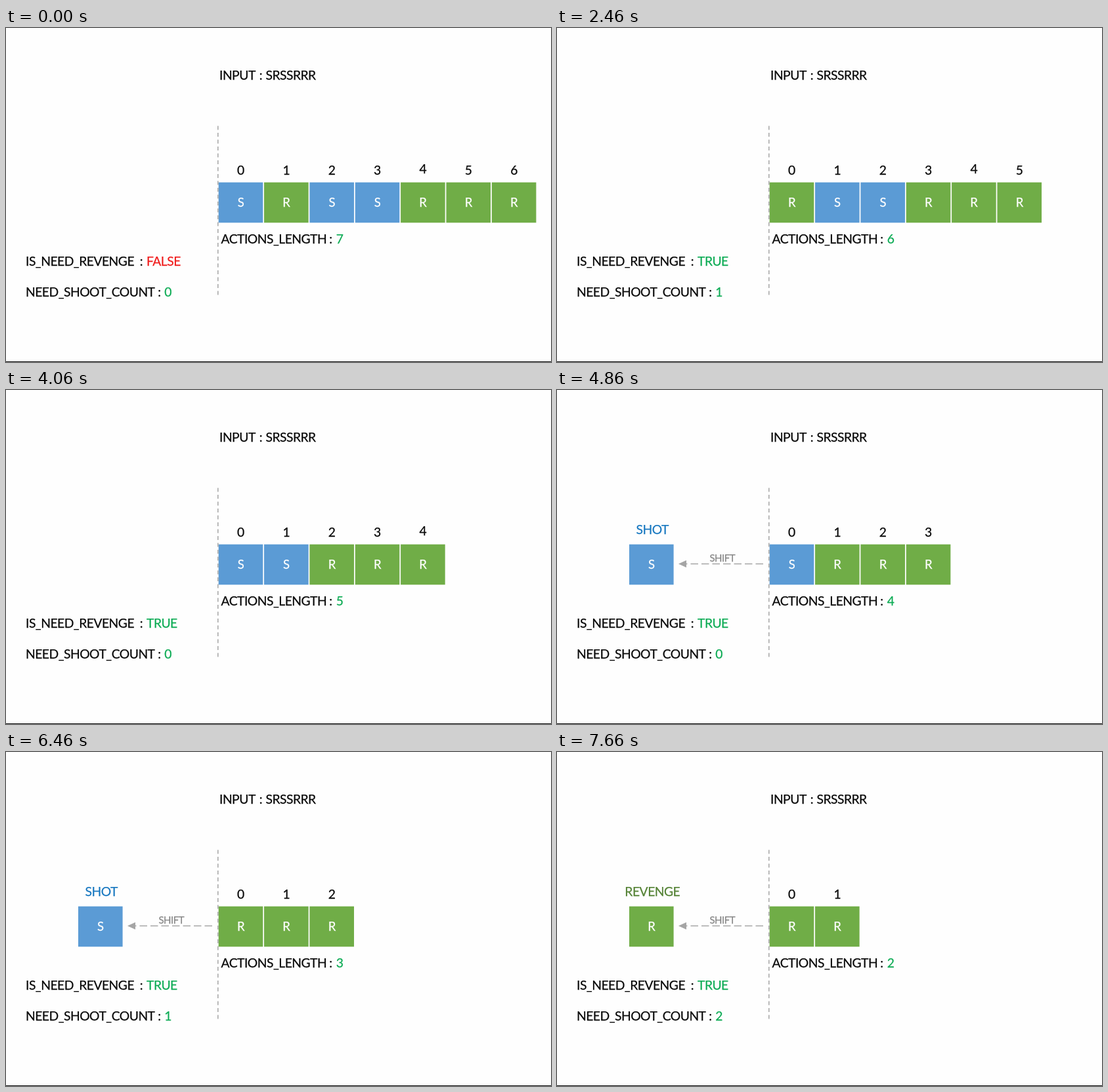
These frames come from a looping animation (830x510 px, 8 s). An HTML page:

```html
<!DOCTYPE html>
<html lang="en">
<head>
<meta charset="utf-8">
<title>Action queue</title>
<style>
  html, body { margin: 0; width: 100%; height: 100%; overflow: hidden; background: #fefefe; }
  svg { display: block; }
  text {
    font: 19.3px Lato, Carlito, sans-serif; letter-spacing: -.5px;
    color: #080808; fill: currentColor; stroke: currentColor; stroke-width: .25;
  }
  .mid { text-anchor: middle; }
  .cell text { font-size: 18.5px; color: #fff; }
  .S rect { fill: #5b9bd5; }
  .R rect { fill: #70ad47; }
  .good { color: #0cab54; }
  .bad { color: #f01c1c; }
  .dash { stroke: #a5a5a5; stroke-width: 1.5; }
</style>
</head>
<body>
<svg width="830" height="510" viewBox="0 0 830 510">
  <rect y="509" width="830" height="1" fill="#111"/>

  <text x="325" y="79">INPUT</text>
  <text x="388" y="79" class="mid">:</text>
  <text x="395.5" y="79">SRSSRRR</text>

  <text x="327.5" y="328.5">ACTIONS_LENGTH</text>
  <text x="494.5" y="328.5" class="mid">:</text>
  <text x="508" y="328.5" class="mid good" id="length"></text>

  <text x="30" y="362.5">IS_NEED_REVENGE</text>
  <text x="206" y="362.5" class="mid">:</text>
  <text x="214" y="362.5" id="revenge"></text>

  <text x="30" y="410">NEED_SHOOT_COUNT</text>
  <text x="233.5" y="410" class="mid">:</text>
  <text x="246.5" y="410" class="mid good" id="count"></text>

  <g id="queue"></g>
  <path class="dash" d="M322.8 149.5V409" stroke-dasharray="6 4.5"/>

  <g id="shifted">
    <text x="145.3" y="219.5" class="mid" id="action"></text>
    <g id="taken"></g>
    <path class="dash" d="M314 265.5H197" stroke-dasharray="11.5 5"/>
    <path d="M185 265.5L197 260V271Z" fill="#a5a5a5"/>
    <text x="251.8" y="262" class="mid" style="font-size:15px;color:#848484">SHIFT</text>
  </g>
</svg>
<script>
const ACTIONS = [...'SRSSRRR'];
const LOOP = 8000;
// Odd steps shift an action out of the queue, even steps apply it.
const CUTS = [1020, 1830, 2630, 3430, 4230, 5030, 5840, 6660, 7450];
const $ = id => document.getElementById(id);

const cell = (x, action) => `<g class="cell ${action}">
  <rect x="${x}" y="235.7" width="67.6" height="61.6"/>
  <text x="${x + 33.8}" y="273" class="mid">${action}</text></g>`;

function queueItem(action, i) {
  const x = 323.7 + i * 69.35;
  const y = i === 4 ? 221.5 : 223.5;
  return `${cell(x, action)}<text x="${x + 33.7}" y="${y}" class="mid">${i}</text>`;
}

function show(step) {
  const removed = Math.ceil(step / 2);
  const applied = ACTIONS.slice(0, Math.floor(step / 2));
  const queue = ACTIONS.slice(removed);
  const needRevenge = applied.length > 0;

  $('queue').innerHTML = queue.map(queueItem).join('');
  $('length').textContent = queue.length;
  $('revenge').textContent = needRevenge ? 'TRUE' : 'FALSE';
  $('revenge').setAttribute('class', needRevenge ? 'good' : 'bad');
  $('count').textContent = applied.reduce((n, a) => n + (a === 'S' ? 1 : -1), 0);

  const shifting = step % 2 === 1;
  $('shifted').style.display = shifting ? '' : 'none';
  if (shifting) {
    const action = ACTIONS[removed - 1];
    $('action').textContent = action === 'S' ? 'SHOT' : 'REVENGE';
    $('action').style.color = action === 'S' ? '#1878c0' : '#548235';
    $('taken').innerHTML = cell(110, action);
  }
}

let shown = -1;
function tick() {
  const time = performance.now() % LOOP;
  const step = CUTS.filter(cut => cut <= time).length;
  if (step !== shown) show(shown = step);
  requestAnimationFrame(tick);
}
tick();
</script>
</body>
</html>
```
